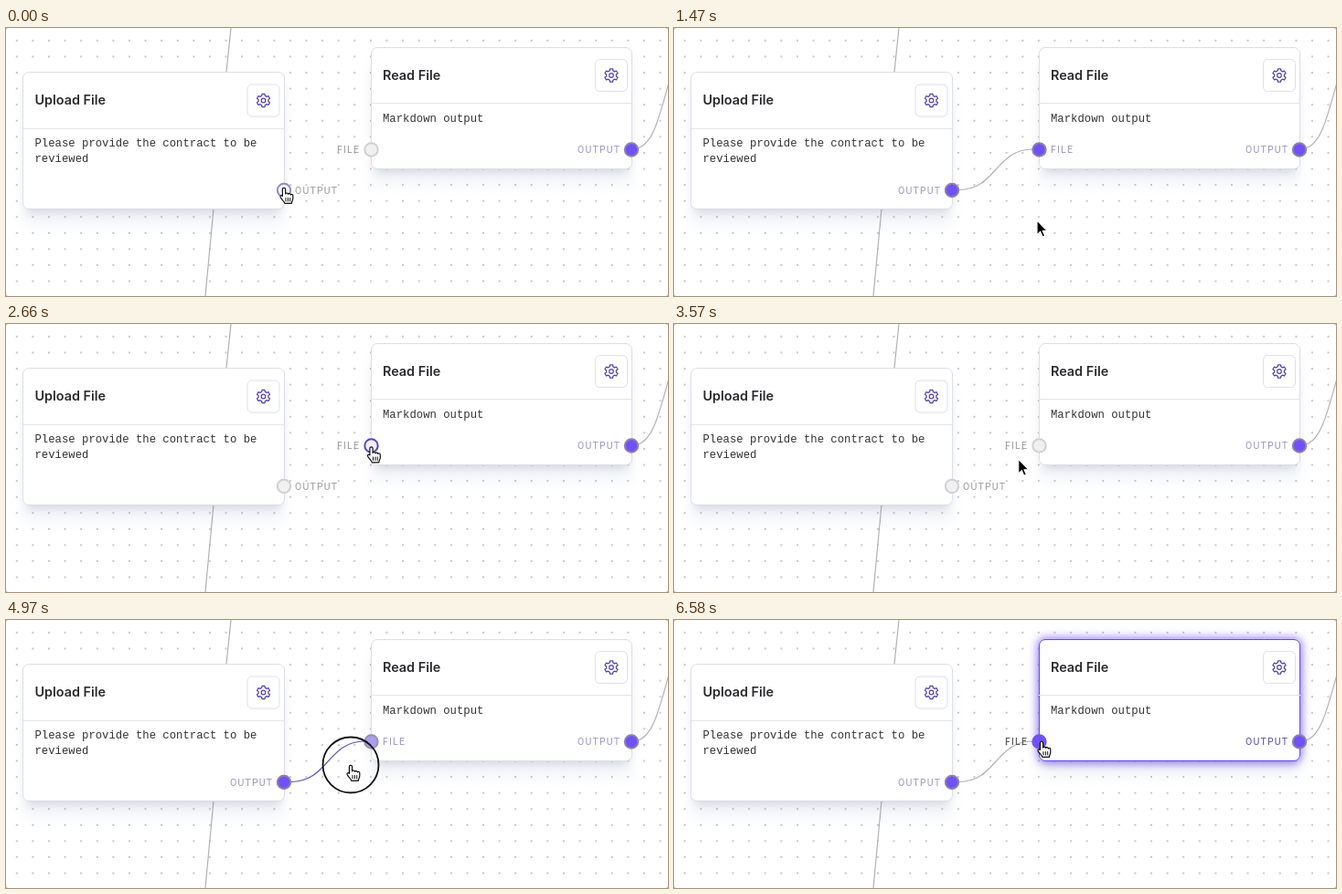
An HTML page that plays this animation: 724x294 px, repeating every 6.65 s.

```html
<!DOCTYPE html>
<html lang="en">
<head>
<meta charset="utf-8">
<title>Connecting nodes</title>
<style>
html, body { margin: 0; width: 100%; height: 100%; overflow: hidden; background: #bbb; }
#stage {
  position: relative; width: 724px; height: 294px; overflow: hidden; border-radius: 3px;
  background: #fff radial-gradient(circle, #c6c6cb .8px, transparent 1.2px) 3px 5px / 17.6px 17.6px;
}
svg { position: absolute; left: 0; top: 0; width: 724px; height: 294px; overflow: hidden; }
.card {
  position: absolute; box-sizing: border-box; width: 286.5px; background: #fff;
  border: 1px solid #dcdee4; border-radius: 7px;
  box-shadow: 0 8px 10px -5px rgba(50, 70, 110, .16), 0 18px 14px 0 rgba(90, 110, 160, .07);
}
.glow {
  position: absolute; inset: -1px; border: 1.5px solid #6947ee; border-radius: 7px; opacity: 0;
  box-shadow: 0 0 10px 2px rgba(105, 71, 238, .65);
}
.title { font: 600 14.4px Inter, sans-serif; fill: #2a2a2e; }
.body { font: 12.27px "Liberation Mono", monospace; fill: #333; }
.label { font: 10.5px Roboto, sans-serif; letter-spacing: 1.2px; }
.box { fill: #fff; stroke: #dfe0e6; }
.gear { fill: none; stroke: #5644a8; stroke-width: 1.25; stroke-linejoin: round; }
.edge { fill: none; stroke: #b1b1b7; stroke-width: 1.2; }
.port { stroke-width: 2; }
.hand { fill: #fff; stroke: #111; stroke-width: 1.2; stroke-linejoin: round; stroke-linecap: round; }
.arrow { fill: #000; stroke: #fff; stroke-width: 1.1; stroke-linejoin: round; }
</style>
</head>
<body>
<div id="stage">
  <svg><path class="edge" d="M246 0L241 48L227 198L218 294"/></svg>
  <div class="card" style="left:18px;top:48px;height:151px"></div>
  <div class="card" style="left:398.5px;top:21px;height:134px"><div class="glow" id="glow"></div></div>
  <svg>
    <path class="edge" d="M691 132C707 127 713 103 725 60"/>
    <path class="edge" id="wire"/>
    <path d="M19 110.5H304M399 82.5H685" stroke="#e3e4e9"/>
    <rect class="box" x="264" y="62" width="35" height="35" rx="5"/>
    <rect class="box" x="644.5" y="34.5" width="35" height="35" rx="5"/>
    <path class="gear" id="gearA" transform="translate(281.5 79.5)"/>
    <path class="gear" id="gearB" transform="translate(662 52)"/>
    <text class="title" x="31.5" y="84.3">Upload File</text>
    <text class="title" x="412" y="57.3">Read File</text>
    <text class="body" x="31.5" y="129.5">Please provide the contract to be</text>
    <text class="body" x="31.5" y="146.8">reviewed</text>
    <text class="body" x="412" y="102.5">Markdown output</text>
    <text class="label" id="outLabel" y="182">OUTPUT</text>
    <text class="label" id="fileLabel" y="137">FILE</text>
    <text class="label" id="readLabel" x="625" y="137">OUTPUT</text>
    <circle class="port" id="outPort" cx="304" cy="178" r="7.2"/>
    <circle class="port" id="filePort" cx="399.5" cy="133.5" r="7.2"/>
    <circle class="port" id="readPort" cx="684" cy="133.5" r="7.2"/>
    <g id="cursor">
      <circle id="press" r="30.5" fill="none" stroke="#111" stroke-width="1.8"/>
      <g class="hand" id="hand">
        <path d="M-1.6 9.4V1.9A1.6 1.6 0 0 1 1.6 1.9V7A1.5 1.5 0 0 1 4.5 7.3A1.5 1.5 0 0 1 7.3 8A1.4 1.4 0 0 1 9.8 9V12C9.8 14 8.5 15 8.3 17.4H.8C.2 15-2.2 13.6-3.8 10.8C-4.6 9-3 8-1.6 9.4Z"/>
        <path d="M2 11.5V15M4.4 11.5V15M6.7 11.5V15" stroke-width="1"/>
      </g>
      <path class="arrow" id="arrow" d="M0 0V15.8L3.6 12.4L6 18L8.6 16.9L6.2 11.5H11.2Z"/>
    </g>
  </svg>
</div>
<script>
const LOOP = 6650, STEP = 70;
const $ = id => document.getElementById(id);
const set = (id, attrs) => { for (const k in attrs) $(id).setAttribute(k, attrs[k]); };
const between = (t, a, b) => t >= a && t < b;

// Pointer hotspot: time, x, y
const track = [
  [0, 304, 175], [70, 304, 176], [350, 325, 160], [700, 366, 133], [910, 397, 126],
  [1120, 398, 129], [1260, 398, 129], [1330, 398, 142], [1470, 397, 211], [1610, 397, 207],
  [1960, 399, 136], [2030, 398.5, 134], [2660, 399.5, 134.5], [3150, 399.5, 134.5],
  [3220, 400.5, 132.5], [3360, 400.5, 132.5], [3700, 362, 158], [4060, 313, 196],
  [4270, 313, 196], [4340, 311, 190], [4480, 304, 181], [4550, 304, 180], [4760, 335, 176],
  [4970, 377, 159], [5180, 402, 131], [5320, 401, 132], [5530, 401, 132], [5600, 401, 138.5],
  [5670, 400, 140], [5740, 400, 140], [5950, 402, 136], [6020, 402, 136], [6160, 402, 133.5],
  [LOOP, 402, 133]
];

function pointerAt(t) {
  const i = track.findIndex(k => k[0] > t);
  const [t0, x0, y0] = track[i - 1], [t1, x1, y1] = track[i];
  const p = (t - t0) / (t1 - t0);
  return [x0 + (x1 - x0) * p, y0 + (y1 - y0) * p];
}

function gear() {
  const at = (r, deg) => {
    const a = deg * Math.PI / 180;
    return (r * Math.cos(a)).toFixed(2) + " " + (r * Math.sin(a)).toFixed(2);
  };
  const pts = [];
  for (let a = -90; a < 270; a += 60)
    pts.push(at(5.5, a - 19), at(7.4, a - 12), at(7.4, a + 12), at(5.5, a + 19));
  return "M" + pts.join("L") + "ZM2.3 0A2.3 2.3 0 1 1 -2.3 0A2.3 2.3 0 1 1 2.3 0Z";
}

function wirePath(x, y) {
  const dx = x - 312;
  const c = dx >= 0 ? dx / 2 : 6.25 * Math.sqrt(-dx);
  return `M312 177.5C${312 + c} 177.5 ${x - c} ${y} ${x} ${y}`;
}

const looks = {
  empty: { fill: "#f0f0f1", stroke: "#d0d0d3" },
  faint: { fill: "#f3f1fb", stroke: "#9189c4" },
  hover: { fill: "#f1effc", stroke: "#5a44bd" },
  snap: { fill: "#ac9eee", stroke: "#9692ab" },
  full: { fill: "#7150fa", stroke: "#8983a6" },
  active: { fill: "#7150fa", stroke: "#7455ee" }
};

function glowAt(t) {
  if (t >= 6510) return t < 6580 ? .6 : 1;
  if (!between(t, 2310, 2660)) return 0;
  return t < 2380 ? .6 : t < 2520 ? 1 : (2660 - t) / 210;
}

function draw(t) {
  const [x, y] = pointerAt(t);
  const near = (px, py) => Math.hypot(x - px, y - py) < 12;
  const onOut = near(304, 178), onFile = near(399.5, 133.5);
  const drag = between(t, 70, 1120) || between(t, 4550, 5320);
  const pressed = drag || between(t, 3220, 3430);
  const joined = between(t, 1120, 2450) || t >= 5320;
  const snapped = drag && Math.hypot(x - 399.5, y - 133.5) < 36;
  const glow = glowAt(t), selected = glow > 0;
  const hand = onOut || onFile || pressed;
  const linked = drag || joined;
  const fileIn = (snapped || joined) && !selected;

  set("cursor", { transform: `translate(${x} ${y})` });
  set("press", { visibility: pressed ? "visible" : "hidden" });
  set("hand", { visibility: hand ? "visible" : "hidden" });
  set("arrow", { visibility: hand ? "hidden" : "visible" });

  set("wire", {
    d: !linked ? "" : joined || snapped ? wirePath(392, 133) : wirePath(x, y),
    style: "stroke:" + (drag || (joined && onFile && !selected) ? "#6553b0" : "#b1b1b7")
  });
  set("outPort", looks[linked ? "full" : onOut ? (t < 70 ? "faint" : "hover") : "empty"]);
  set("filePort", looks[joined ? (selected ? "active" : "full") : snapped ? "snap" : onFile ? "hover" : "empty"]);
  set("readPort", looks.full);
  set("outLabel", { x: linked ? 245 : 316, fill: linked ? "#9a96bd" : "#9b9b9f" });
  set("fileLabel", { x: fileIn ? 412 : 362, fill: selected ? "#444449" : fileIn ? "#9a96bd" : "#9b9b9f" });
  set("readLabel", { fill: selected ? "#5a4c9f" : "#9a95c4" });
  $("glow").style.opacity = glow;
}

set("gearA", { d: gear() });
set("gearB", { d: gear() });
const start = performance.now();
function tick() {
  const t = (performance.now() - start) % LOOP;
  draw(Math.floor(t / STEP) * STEP);
  requestAnimationFrame(tick);
}
tick();
</script>
</body>
</html>
```
